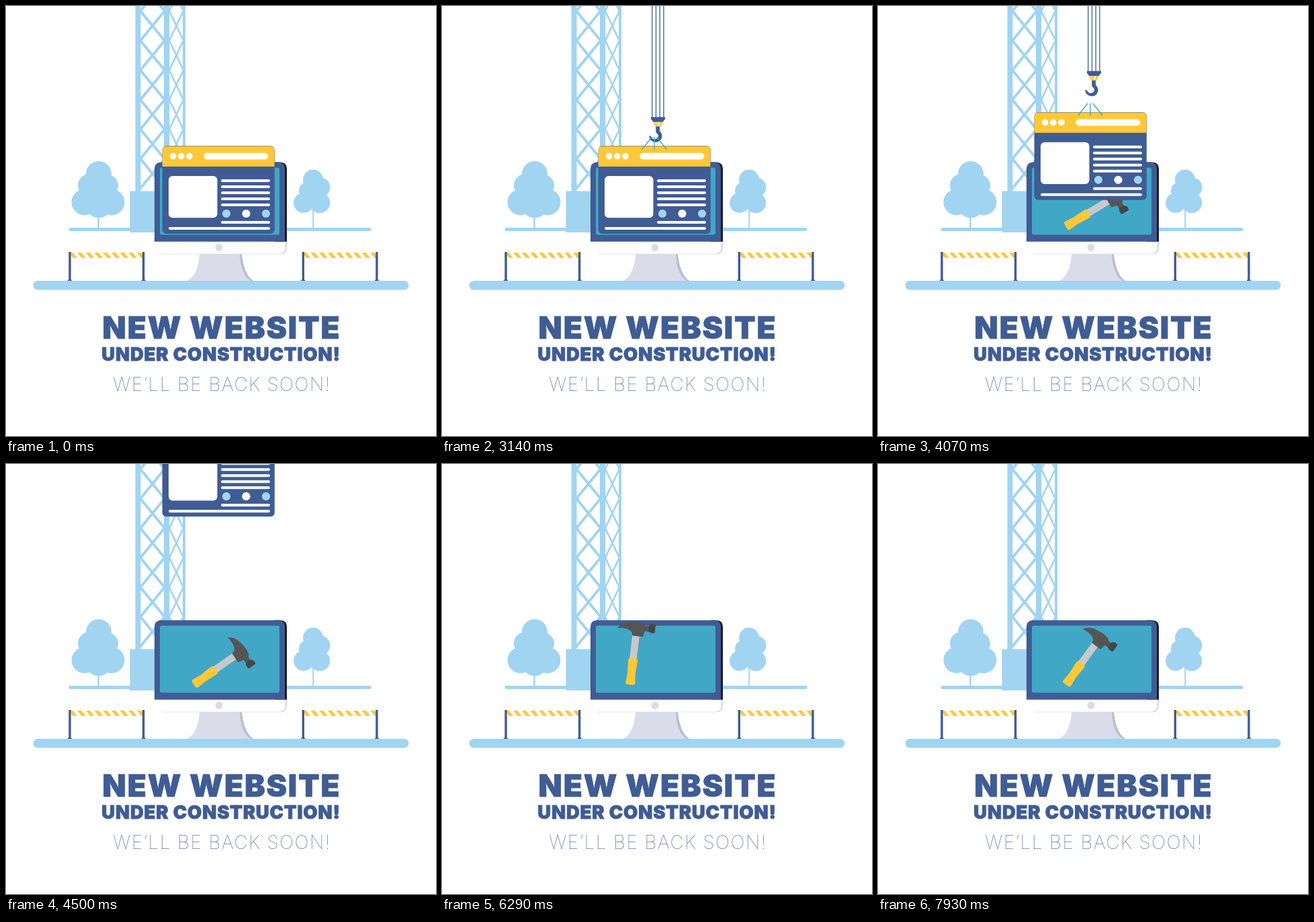
Write an HTML page that moves like this. It is 640 by 640 pixels and loops after 8000 ms.

```html
<!DOCTYPE html>
<html lang="en">
<head>
<meta charset="utf-8">
<title>Under construction</title>
<style>
html, body { margin: 0; width: 100%; height: 100%; overflow: hidden; background: #fff; }
svg { display: block; width: 100%; height: 100%; }
.sky { fill: #a1d4f1; }
.navy { fill: #3f5c94; }
.sun { fill: #ffc837; }
.white { fill: #fff; }
.line { fill: none; stroke-linecap: round; }
text { font-family: Inter, "Open Sans", sans-serif; fill: #3f5c94; text-anchor: middle; }
.bold { font-weight: 900; stroke: #3f5c94; stroke-width: .8; }
</style>
</head>
<body>
<svg viewBox="0 0 640 640">
  <defs>
    <clipPath id="front"><path d="M0 -400H640V340H0Z"/></clipPath>
    <pattern id="tape" width="12.7" height="8" patternUnits="userSpaceOnUse" x="6.3" y="367">
      <path class="sun" d="M-6.3 0H0L6.3 8H0ZM6.4 0H12.7L19 8H12.7Z"/>
    </pattern>
    <g id="barrier">
      <path fill="url(#tape)" d="M3 367H110V375H3Z"/>
      <path class="navy" d="M0 366H3.4V407L5 409H-2L0 407ZM109.6 366H113V407L115 409H108L109.6 407Z"/>
    </g>
  </defs>

  <path class="line" stroke="#a1d4f1" stroke-width="5" d="M96 332.5H541"/>
  <g class="sky">
    <g id="trees"></g>
    <path d="M136.3 300H138.7V331H136.3ZM456.2 285H458.2V331H456.2Z"/>
    <path d="M192.5 0H200.5V277H192.5ZM235 0H243.3V277H235ZM263 0H267V277H263ZM184.4 275.5H240V337H184.4Z"/>
    <rect x="40.5" y="409" width="559" height="13.5" rx="6.7"/>
  </g>
  <path id="wide" class="line" stroke="#a1d4f1" stroke-width="4"/>
  <path id="slim" class="line" stroke="#a1d4f1" stroke-width="2.7"/>
  <use href="#barrier" x="93.3"/>
  <use href="#barrier" x="440.6"/>

  <!-- monitor -->
  <path fill="#dadce9" d="M288 369H348C350 388 355 402 368 409H270C282 402 287 388 288 369Z"/>
  <path fill="#bcbdd2" d="M348 369H351C353 388 358 402 368 409H364C353 402 349 388 348 369Z"/>
  <path fill="#dadce9" d="M405 345H418V360Q418 369.5 408 369.5H231V368.5Z"/>
  <path class="white" d="M221 350H415.5V359Q415.5 368.7 405.5 368.7H231Q221 368.7 221 359Z"/>
  <path fill="#14183a" d="M400 232.5H408Q418 232.5 418 242.5V350.7H400Z"/>
  <path class="navy" d="M221 350.7V242.5Q221 232.5 231 232.5H405Q415 232.5 415 242.5V350.7Z"/>
  <rect x="229" y="240.5" width="178" height="100" rx="3" fill="#41a7c6"/>
  <circle cx="317" cy="359.5" r="5.5" fill="#dadce9"/>

  <g id="hammer">
    <path fill="#c8c8cc" d="M-5.3 -36H5.3V-75H-5.3Z"/>
    <path class="sun" d="M-4 .5Q-7 .5 -7 -3L-5.9 -16L-7 -36Q-7 -39 -4 -39H4Q7 -39 7 -36L5.9 -16L7 -3Q7 .5 4 .5Z"/>
    <path fill="#555" d="M-28.5 -81C-25 -87 -20 -90 -14 -91.5C-8 -93 -1 -94 5 -93.3L10.5 -92L13 -89.5H19V-81H12.5L10.7 -72.5H-5L-6.5 -77.5C-11 -82 -20 -83 -28.5 -81Z"/>
    <path fill="#454547" d="M18 -90L21 -93H25.5Q27.5 -93 27.5 -91V-81.5Q27.5 -79.5 25.5 -79.5H21L18 -81.5Z"/>
  </g>

  <g clip-path="url(#front)">
    <g id="page">
      <rect class="navy" x="232.6" y="208.3" width="167.2" height="130.7" rx="6"/>
      <path class="sun" d="M232.7 239V214.7Q232.7 208.7 238.7 208.7H393.5Q399.5 208.7 399.5 214.7V239Z"/>
      <g class="white">
        <circle cx="248.8" cy="223.6" r="4.8"/>
        <circle cx="260.9" cy="223.6" r="4.8"/>
        <circle cx="273" cy="223.6" r="4.8"/>
        <rect x="294.3" y="218.8" width="96" height="9.6" rx="4.8"/>
        <rect x="242" y="253" width="72.5" height="62.3" rx="6"/>
        <circle cx="357.5" cy="309" r="6.1"/>
      </g>
      <circle class="sky" cx="328" cy="309" r="6.1"/>
      <circle class="sky" cx="387" cy="309" r="6.1"/>
      <path class="line" stroke="#fff" stroke-width="3.9" d="M322 260H391M322 269H391M322 278H391M322 287H391M322 296H391M322 322H391M244 331H391"/>
    </g>
  </g>

  <g id="hook">
    <path class="line" stroke="#3f5c94" stroke-width="1.3" d="M312.8 -400V167M318.5 -400V167M324.2 -400V167M329.9 -400V167"/>
    <path class="navy" d="M311 165H332V168L328.5 172.5H314.5L311 168Z"/>
    <path class="sun" d="M314.5 172.5H317L320 179H317.3ZM319.5 172.5H322.5L320.5 179H318ZM325 172.5H328.5L325.7 179H322.5Z"/>
    <path class="navy" d="M318.3 179H324V186C326.5 188 327.5 190.5 327.5 193.5A9 9 0 0 1 318.5 202.5C313 202.5 308.5 199 308.5 193.5L310 192.5C311.5 196 314 198 317 198A5 5 0 0 0 322 193C322 190 319 189.5 318.3 187Z"/>
  </g>
  <path id="slings" class="line" stroke="#41a7c6" stroke-width="1.4" d="M-18 0L-4 -17.5M0 0V-17.5M18 0L4 -17.5"/>

  <text class="bold" x="321" y="495.2" font-size="46" letter-spacing="1.8">NEW WEBSITE</text>
  <text class="bold" x="320" y="528" font-size="27.5" letter-spacing=".8">UNDER CONSTRUCTION!</text>
  <text x="321.5" y="573" font-size="28" font-weight="100" letter-spacing="1.4">WE’LL BE BACK SOON!</text>
</svg>
<script>
const $ = id => document.getElementById(id);
const move = (id, v) => $(id).setAttribute('transform', v);
const LOOP = 8000, TRAVEL = 307;

const crowns = [
  [138, 250, 19], [124, 267, 17], [151, 267, 16], [117, 292, 19.5], [157, 292, 19.5], [138, 296, 19.5],
  [457, 258.5, 15], [468, 270, 14.5], [449, 275, 13], [443, 293, 15], [467, 293, 15.3]
];
$('trees').innerHTML = crowns.map(([x, y, r]) => `<circle cx="${x}" cy="${y}" r="${r}"/>`).join('');

function lattice(x1, x2) {
  const step = 44;
  let d = '';
  for (let y = 7.5 - step; y < 250; y += step)
    d += `M${x1} ${y}L${x2} ${y + step}M${x2} ${y}L${x1} ${y + step}`;
  return d;
}
$('wide').setAttribute('d', lattice(200, 236));
$('slim').setAttribute('d', lattice(243, 264));

const backIn = (u, s) => u * u * ((s + 1) * u - s);
const lift = v => -TRAVEL * backIn(Math.max(0, v), .757);

// Slow raise, then a quick strike.
function hammerAngle(t) {
  const period = 2780, raise = 2330;
  const p = (t - 6945 + 3 * period) % period;
  if (p < raise) {
    const v = p / raise;
    return 24.5 + 63.5 * (v + .17 * v * (1 - v));
  }
  return 24.5 + 31.75 * (1 + Math.cos(Math.PI * (p - raise) / (period - raise)));
}

function draw(t) {
  const hookY = t < 2000 ? lift(1 - (t - 45) / 1525) : lift((t - 3100) / 1400);
  const pageY = lift((t - 3160) / 1400);
  const grow = 1 - backIn(1 - Math.min(1, Math.max(0, (t - 1760) / 1360)), 1.7);
  move('hook', `translate(0 ${hookY})`);
  move('page', `translate(0 ${pageY})`);
  move('slings', `translate(316 ${213 + pageY}) scale(${grow})`);
  $('slings').style.display = grow > .001 ? '' : 'none';
  move('hammer', `translate(280 328) rotate(${90 - hammerAngle(t)})`);
}

const start = performance.now();
function frame() {
  draw((performance.now() - start) % LOOP);
  requestAnimationFrame(frame);
}
frame();
</script>
</body>
</html>
```
